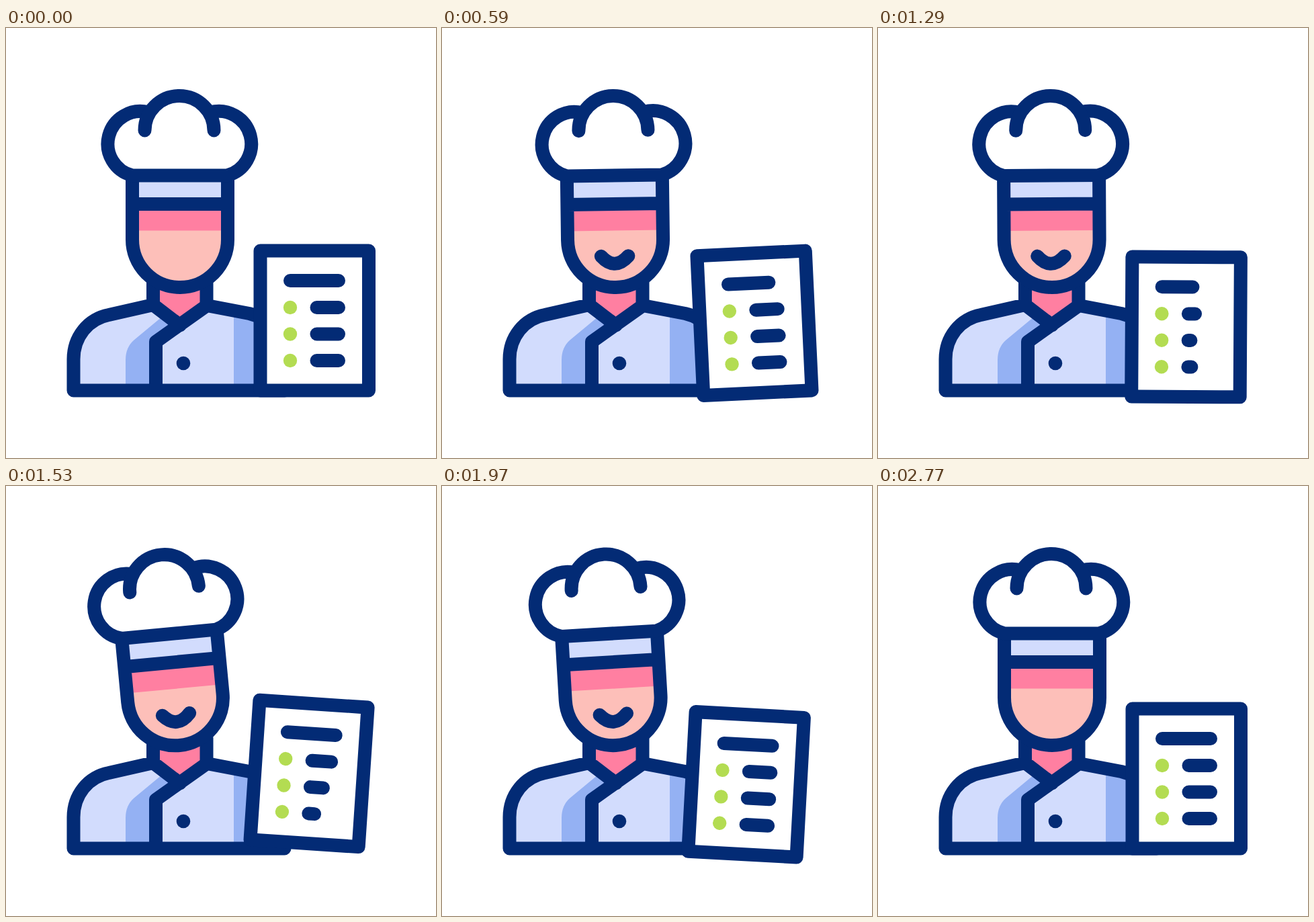
Write an HTML page that moves like this. It is 640x640 px and loops after 2.83 s.

```html
<!DOCTYPE html>
<html lang="en">
<head>
<meta charset="utf-8">
<title>Chef with menu</title>
<style>
  html, body { margin: 0; width: 100%; height: 100%; overflow: hidden; background: #fff; }
  svg { display: block; width: 100vw; height: 100vh; }
  .line { fill: none; stroke: #032b75; stroke-width: 20; stroke-linecap: round; stroke-linejoin: round; }
  .white { fill: #fff; }
  .light { fill: #d2dcfd; }
  .shade { fill: #94b1f3; }
  .pink { fill: #ff7fa1; }
  .skin { fill: #fdbfb9; }
  .green { fill: #b3dc52; }
  .yellow { fill: #ffcb50; }
</style>
</head>
<body>
<svg viewBox="0 0 640 640">
  <g id="body">
    <path class="pink" d="M219 370H299V412L259 443L219 412Z"/>
    <path class="light" d="M259 442.5L219 412L153 427C122 433 100.5 460 100.5 493V539.5H414.5V493C414.5 460 393 432 362 425L299 413Z"/>
    <path class="shade" d="M178 535V494Q178 475 191 464L232 430L250 443L220 470V535ZM339 420L362 425C393 432 414.5 460 414.5 493V539H339Z"/>
    <path class="line" d="M259 442.5L219 412L153 427C122 433 100.5 460 100.5 493V539.5H414.5V493C414.5 460 393 432 362 425L299 413L223 467V539M219 375V412M298.5 375V413"/>
    <circle cx="264" cy="499" r="10.3" fill="#032b75"/>
  </g>
  <g id="head">
    <g id="dots" class="yellow"></g>
    <path class="skin" d="M188 262V315A71 71 0 0 0 330 315V262Z"/>
    <path class="pink" d="M188 262H330V301.5H188Z"/>
    <path class="light" d="M188 219.5H330V262H188Z"/>
    <path class="line" d="M188 219.5V315A71 71 0 0 0 330 315V219.5M188 262H330"/>
    <path class="line white" style="fill:#fff" d="M212 125.5A48.5 48.5 0 1 0 188 219.5H329A48.5 48.5 0 1 0 304 125.5"/>
    <path class="line" style="fill:#fff" d="M206.5 152.5A51.5 51.5 0 0 1 309.5 152.5"/>
    <path id="smile" class="line" pathLength="1" d="M237.5 339.5Q257.5 362 278 339.5"/>
  </g>
  <g id="menu">
    <path class="line" style="fill:#fff" d="M378.5 331.5H540V539.5H378.5Z"/>
  </g>
</svg>
<script>
const LOOP = 2830;
const byId = id => document.getElementById(id);
const head = byId('head'), menu = byId('menu'), smile = byId('smile');

function add(parent, tag, attrs) {
  const el = document.createElementNS('http://www.w3.org/2000/svg', tag);
  for (const name in attrs) el.setAttribute(name, attrs[name]);
  return parent.appendChild(el);
}

// Eased progress from 0 to 1 between two times
function ease(t, from, to) {
  const u = Math.min(1, Math.max(0, (t - from) / (to - from)));
  return (1 - Math.cos(Math.PI * u)) / 2;
}

// Value at time t along [time, value] keys
function track(t, keys) {
  let value = keys[0][1];
  for (let i = 1; i < keys.length; i++) {
    const [t0, v0] = keys[i - 1], [t1, v1] = keys[i];
    if (t >= t0) value = v0 + (v1 - v0) * ease(t, t0, t1);
  }
  return value;
}

const headTilt = [[90, 0], [420, 5.5], [735, -5.5], [1045, 5.5], [1520, -5.5], [1730, 5.5], [2070, -5.5], [2335, 0]];
const menuTilt = [[130, 0], [480, -5.8], [800, 5.8], [1120, -5.8], [1450, 5.8], [1750, -5.8], [2075, 5.8], [2290, 0]];
const menuDrop = [[90, 0], [340, -13.5], [720, 10], [980, -13.5], [1290, 9.4], [1660, -13.5], [1970, 9], [2210, 0]];

const bars = [376, 416, 455.5, 495].map((y, i) => {
  const x = i ? 462.5 : 423;
  if (i) add(menu, 'circle', { class: 'green', cx: 423, cy: y, r: 10.2 });
  return { x, start: 440 + i * 130, el: add(menu, 'line', { class: 'line', x1: x, y1: y, y2: y }) };
});

const puffs = [-54, 0, 54].map(dx => ({
  top: dx ? 46 : 35,
  el: add(byId('dots'), 'circle', { cx: 259 + dx })
}));

function draw(t) {
  head.setAttribute('transform', `rotate(${track(t, headTilt)} 259 390)`);
  menu.setAttribute('transform', `translate(0 ${track(t, menuDrop)}) rotate(${track(t, menuTilt)} 459 313)`);

  const grin = ease(t, 90, 580) - ease(t, 1960, 2500);
  smile.style.display = grin > 0.001 ? '' : 'none';
  smile.setAttribute('stroke-dasharray', `${grin} 2`);

  for (const { x, start, el } of bars) {
    const shrink = ease(t, start, start + 545) - ease(t, start + 545, start + 1090);
    el.setAttribute('x2', x + (495 - x) * (1 - 0.9 * shrink));
  }

  const rise = ease(t, 2055, 2615);
  const size = ease(t, 2055, 2160) - ease(t, 2500, 2750);
  for (const { top, el } of puffs) {
    el.setAttribute('cy', top + 73 * (1 - rise));
    el.setAttribute('r', 10.2 * size);
  }
}

function tick() {
  draw(performance.now() % LOOP);
  requestAnimationFrame(tick);
}
tick();
</script>
</body>
</html>
```
